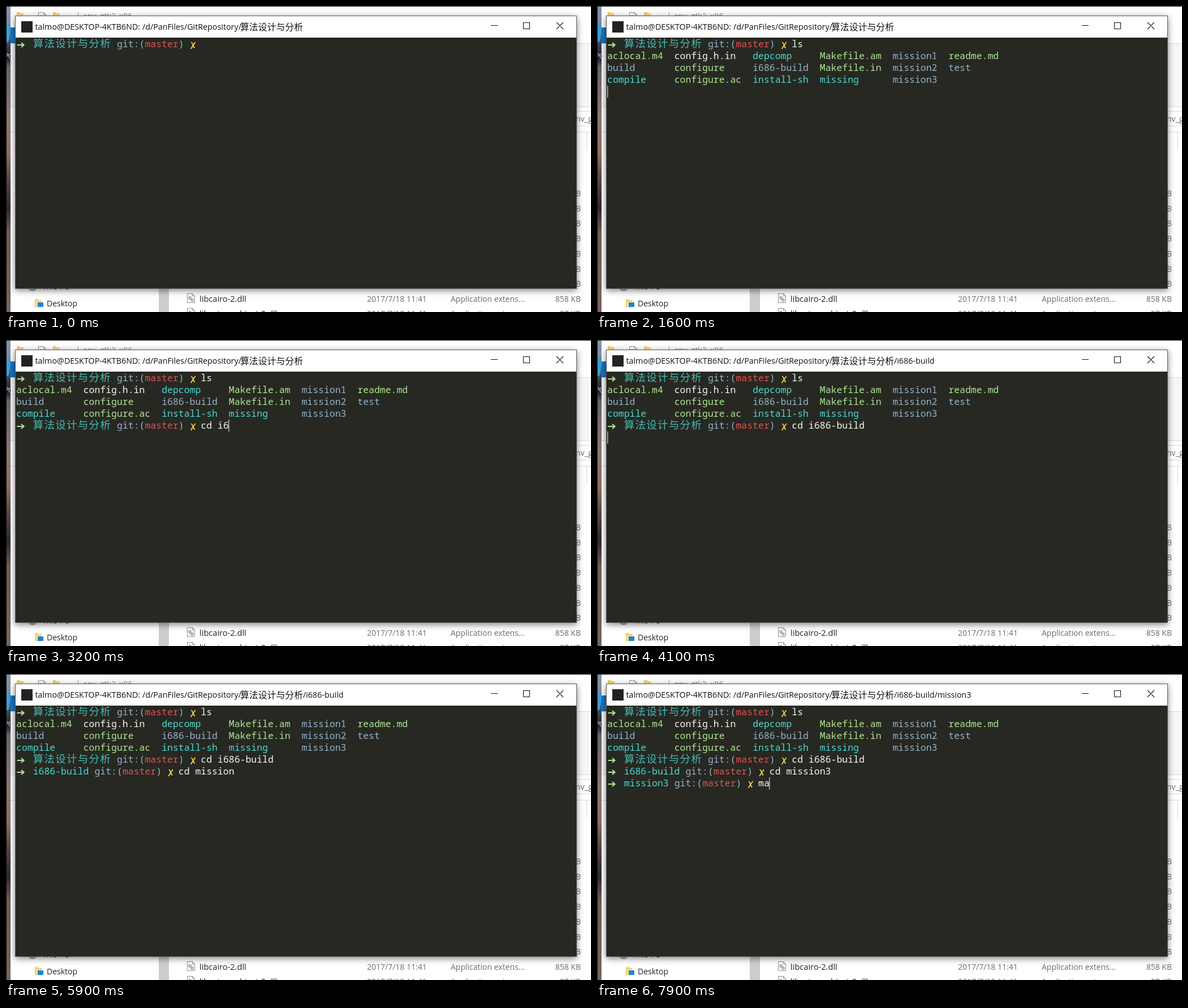
An HTML page for the animation above (8000 ms loop, 1034 by 542 pixels).

```html
<!DOCTYPE html>
<html lang="en">
<head>
<meta charset="utf-8">
<title>Terminal session</title>
<style>
  html, body { margin: 0; width: 100%; height: 100%; overflow: hidden; background: #fff; }
  svg { display: block; width: 1034px; height: 542px; }
  text { white-space: pre; }
  .ui { font: 14px "Open Sans", "Noto Sans", sans-serif; fill: #6d6d6d; }
  .title { font: 14.3px "Open Sans", "Noto Sans", sans-serif; fill: #111; }
  .cjk { font: 15.86px "Noto Sans CJK SC", "Noto Sans CJK", sans-serif; }
  .term { font: 16.48px "Noto Sans Mono", "DejaVu Sans Mono", monospace; }
  .term .wide { font: 300 18.6px "Noto Sans CJK SC", "Noto Sans CJK", sans-serif; letter-spacing: 1.18px; opacity: .82; }
  .window { filter: drop-shadow(0 3px 6px rgba(0, 0, 0, .5)); }
  .line { fill: none; stroke: #d9d9d9; }
</style>
</head>
<body>
<svg viewBox="0 0 1034 542">
  <defs>
    <linearGradient id="wallpaper" x2="0" y2="1">
      <stop offset="0" stop-color="#8793a5"/>
      <stop offset=".05" stop-color="#7d90a8"/>
      <stop offset=".13" stop-color="#39434f"/>
      <stop offset=".17" stop-color="#1d222b"/>
      <stop offset=".2" stop-color="#68646c"/>
      <stop offset=".36" stop-color="#8d7873"/>
      <stop offset=".48" stop-color="#936f60"/>
      <stop offset=".56" stop-color="#5c4a47"/>
      <stop offset=".66" stop-color="#30292b"/>
      <stop offset=".74" stop-color="#6f5d56"/>
      <stop offset="1" stop-color="#77645d"/>
    </linearGradient>
    <g id="folder">
      <path d="M0 0h5l2 2h5v13H0z" fill="#f4cf68"/>
      <path d="M2 4h10v11H2z" fill="#fbe198"/>
    </g>
    <g id="file">
      <path d="M.5.5h9l4 4v12H.5z" fill="#fff" stroke="#8d8d8d"/>
      <path d="M9.5.5v4h4" fill="none" stroke="#8d8d8d"/>
      <g fill="none" stroke="#6e8ba3" stroke-width="1.3">
        <circle cx="5" cy="8" r="2"/><circle cx="9" cy="12" r="2"/>
      </g>
    </g>
  </defs>

  <!-- Desktop and file manager -->
  <rect width="1034" height="542" fill="#fff"/>
  <rect width="8" height="542" fill="url(#wallpaper)"/>
  <path d="M0 30q7 3 8 12l-3 20-5 4z" fill="#38a1e2"/>
  <text class="ui" x="-2" y="92" style="font-size:11px;fill:#fff">P(</text>
  <path d="M8 38h10v28H8z" fill="#1774c5"/>
  <path d="M8 66h1026v112H8z" fill="#f6f6f7"/>
  <path class="line" d="M8 66.5h1026M8 178.5h1026M8 223.5h1026M1034 186.5h-30v26h30M1026.5 224v31"/>
  <use href="#folder" x="19" y="11"/>
  <use href="#file" x="57" y="11"/>
  <use href="#folder" x="83" y="11"/>
  <path d="M127.5 11v10" stroke="#999"/>
  <text class="ui" x="136" y="23" style="fill:#888">env_gtk2_x86</text>
  <text class="ui" x="1007" y="205">nv_g</text>
  <g id="sizes" class="ui"></g>
  <path d="M270 224h18v318h-18z" fill="#cdcdcd"/>
  <path d="M38 500h18l-6 5h-6z" fill="#a8adb2"/>
  <text class="ui" x="64" y="502" style="fill:#222">This PC</text>
  <use href="#folder" x="51" y="519"/>
  <path d="M56 525h10v8H56z" fill="#1d86d8"/>
  <text class="ui" x="72" y="532" style="fill:#222">Desktop</text>
  <g id="files" class="ui"></g>

  <!-- Terminal window -->
  <g class="window">
    <rect x="16" y="17" width="993" height="484" fill="#5a5a57"/>
  </g>
  <path d="M17 18h991v38H17z" fill="#fff"/>
  <path d="M17 56h991v444H17z" fill="#272822"/>
  <rect x="27" y="27" width="20" height="20" fill="#222"/>
  <text class="title" x="51.5" y="42">talmo@DESKTOP-4KTB6ND: /d/PanFiles/GitRepository/</text>
  <text class="title cjk" x="414" y="43">算法设计与分析</text>
  <text class="title" id="subpath" x="525" y="42"></text>
  <path d="M857 34.5h12M914.5 29.5h11v11h-11zM973 29l12 12m0-12l-12 12" fill="none" stroke="#111" stroke-width="1.1"/>
  <g id="terminal" class="term"></g>
  <path d="M0 .5h1034M.5 0v542" stroke="#111"/>
</svg>

<script>
const LEFT = 18, TOP = 57.3, CELL = 9.89, ROW = 21.03, LOOP = 8000;
const COLOR = { g: '#aee692', c: '#4bd9d2', b: '#94b4cc', w: '#f8f8f2', r: '#e05252', y: '#f5d747' };
const ROOT = '算法设计与分析';

const $ = id => document.getElementById(id);
const colX = col => LEFT + col * CELL;
const rowY = row => Math.round(TOP + row * ROW);

// Explorer rows
$('sizes').innerHTML = Array.from({ length: 7 }, (_, i) =>
  `<text x="1007" y="${337 + i * 26.7}">B</text>`).join('');
$('files').innerHTML = [['libcairo-2.dll', '858 KB'], ['libcairo-gobject-2.dll', '27 KB']]
  .map(([name, size], i) => {
    const y = 524 + i * 26;
    return `<use href="#file" x="320" y="${y - 15}"/>
      <text x="342" y="${y}" style="font-size:14.6px;fill:#222">${name}</text>
      <text x="638" y="${y}">2017/7/18 11:41</text>
      <text x="786" y="${y}">Application extens...</text>
      <text x="1016" y="${y}" text-anchor="end">${size}</text>`;
  }).join('');

const put = (col, row, text, color, cls = '') =>
  `<text class="${cls}" x="${colX(col)}" y="${rowY(row) + 16}" fill="${COLOR[color]}">${text}</text>`;

// Directory listing: a colour letter before each name
const listing = [
  'g:aclocal.m4 w:config.h.in c:depcomp g:Makefile.am b:mission1 g:readme.md',
  'b:build g:configure b:i686-build g:Makefile.in b:mission2 b:test',
  'c:compile g:configure.ac c:install-sh c:missing b:mission3',
].map((line, i) => line.split(' ').map((item, k) =>
  put([0, 12, 26, 38, 51, 61][k], i + 1, item.slice(2), item[0])).join('')).join('');

// Prompt rows: working folder and the command finally entered
const PROMPTS = {
  0: [ROOT, 'ls'],
  4: [ROOT, 'cd i686-build'],
  5: ['i686-build', 'cd mission3'],
  6: ['mission3', ''],
};
const folderCells = folder => folder === ROOT ? 2 * folder.length : folder.length;
const commandCol = row => folderCells(PROMPTS[row][0]) + 19;

function prompt(row, command) {
  const folder = PROMPTS[row][0];
  const git = folderCells(folder) + 4;
  const y = rowY(row) + 12;
  const x = colX(git + 13);
  return `<path d="M19.5 ${y}h12m-4.5-4l4.5 4-4.5 4" fill="none" stroke="${COLOR.g}" stroke-width="2.2"/>` +
    put(3, row, folder, 'c', folder === ROOT ? 'wide' : '') +
    put(git, row, 'git:(', 'b') + put(git + 5, row, 'master', 'r') + put(git + 11, row, ')', 'b') +
    `<path d="M${x + 2.5} ${y - 4.5}q2 0 3 4t3.5 6M${x + 10} ${y - 5}l-8 12" fill="none" stroke="${COLOR.y}" stroke-width="1.7"/>` +
    put(commandCol(row), row, command, 'w');
}

// [time, row, typed command (null before the prompt), cursor shown]
const STEPS = [
  [0, 0, '', 0], [1000, 0, '', 1], [1200, 0, 'l', 1], [1300, 0, 'ls', 1],
  [1500, 1, null, 1], [1600, 4, null, 1],
  [1800, 4, 'c', 1], [1900, 4, 'cd', 1], [2000, 4, 'cd ', 1],
  [2500, 4, 'cd i', 1], [2900, 4, 'cd i', 0], [3200, 4, 'cd i6', 1],
  [3400, 4, 'cd i68', 1], [3600, 4, 'cd i686-build/', 1],
  [4100, 5, null, 1], [4500, 5, '', 1], [4700, 5, '', 0],
  [4900, 5, 'c', 1], [5000, 5, 'cd', 1], [5100, 5, 'cd ', 1],
  [5300, 5, 'cd m', 1], [5500, 5, 'cd mis', 1], [5700, 5, 'cd mission', 1],
  [5900, 5, 'cd mission', 0], [6100, 5, 'cd mission', 1],
  [6300, 5, 'cd mission3', 1], [6400, 5, 'cd mission3/', 1],
  [6900, 6, null, 1], [7400, 6, '', 1], [7600, 6, '', 0],
  [7800, 6, 'm', 1], [7900, 6, 'ma', 1],
];

function draw([, row, typed, cursor]) {
  let out = row >= 4 ? listing : '';
  for (const key of Object.keys(PROMPTS)) {
    if (+key < row) out += prompt(+key, PROMPTS[key][1]);
  }
  if (typed !== null) out += prompt(row, typed);
  if (cursor) {
    const col = typed === null ? 0 : commandCol(row) + typed.length;
    out += `<rect x="${Math.floor(colX(col))}" y="${rowY(row)}" width="1.5" height="21.5" fill="#b5b5b0"/>`;
  }
  $('terminal').innerHTML = out;
  $('subpath').textContent = (row >= 5 ? '/i686-build' : '') + (row >= 6 ? '/mission3' : '');
}

let shown;
function tick() {
  const time = performance.now() % LOOP;
  const step = STEPS.findLast(s => s[0] <= time);
  if (step !== shown) draw(shown = step);
  requestAnimationFrame(tick);
}
tick();
</script>
</body>
</html>
```
